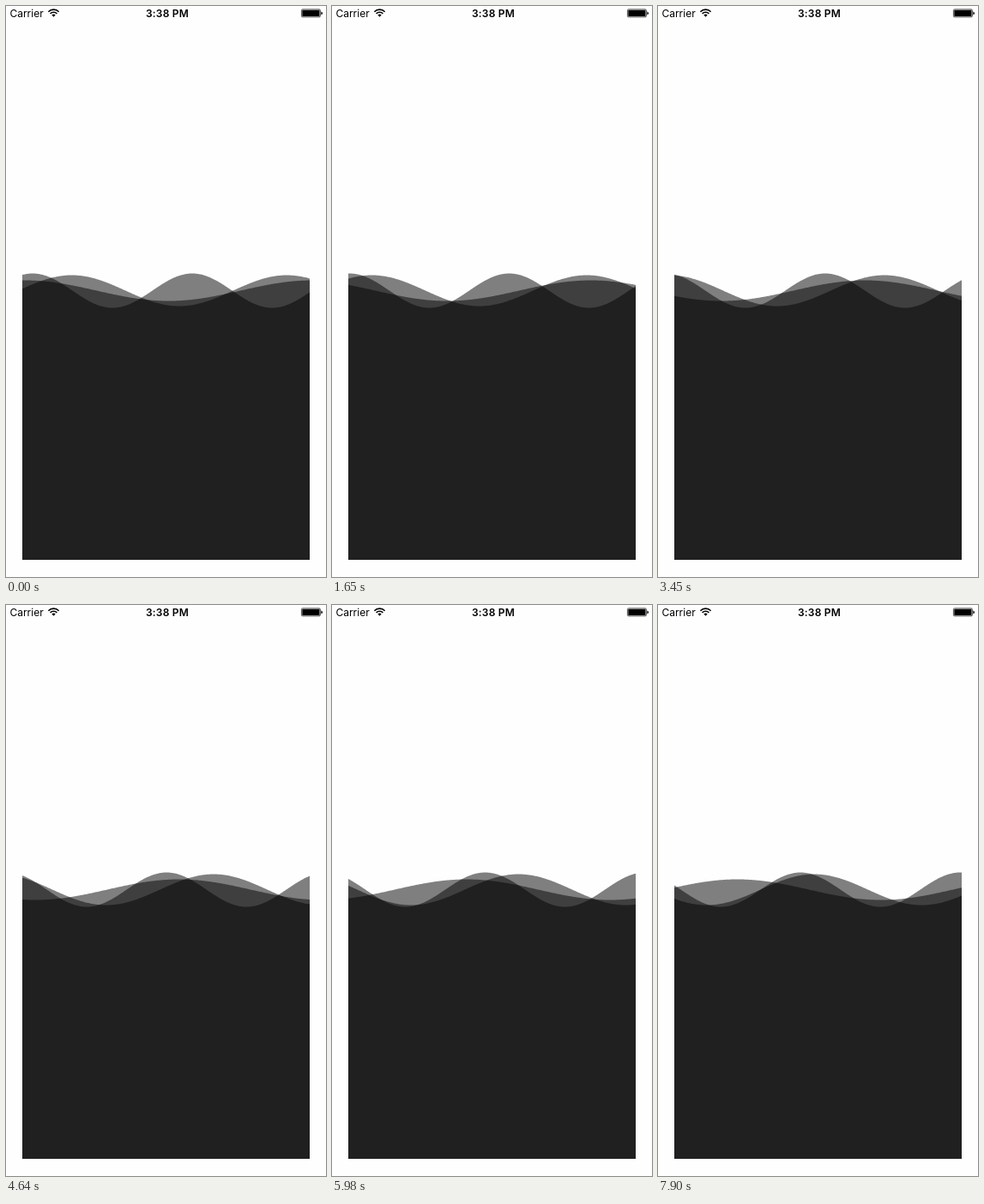
Recreate the animation shown at these times as an HTML page with a canvas. Size 373 by 665 pixels, loop 8 s.

```html
<!DOCTYPE html>
<html lang="en">
<head>
<meta charset="utf-8">
<title>Waves</title>
<style>
  html, body { margin: 0; width: 100%; height: 100%; overflow: hidden; background: #fefefe; }
  canvas, svg { position: absolute; left: 0; top: 0; display: block; }
  text { font-family: Inter, "Open Sans", sans-serif; font-size: 12px; fill: #000; }
  .time { font-weight: 600; letter-spacing: 0.2px; text-anchor: middle; }
</style>
</head>
<body>
<canvas id="stage" width="373" height="665"></canvas>
<svg width="373" height="20" viewBox="0 0 373 20">
  <text x="4.4" y="12.7">Carrier</text>
  <g fill="none" stroke="#000" stroke-width="1.6">
    <path d="M49.4 6.7A8.6 8.6 0 0 1 61.6 6.7"/>
    <path d="M51.6 8.9A5.5 5.5 0 0 1 59.4 8.9"/>
  </g>
  <path d="M55.5 12.8L53.4 10.6A3 3 0 0 1 57.6 10.6Z"/>
  <text class="time" x="188" y="12.7">3:38 PM</text>
  <rect x="344.4" y="3.9" width="22" height="9" rx="1.4" fill="none" stroke="#000" stroke-width="0.7"/>
  <rect x="345.3" y="4.8" width="20.2" height="7.2" rx="0.6"/>
  <path d="M367.4 6.6Q369 7 369 8.4T367.4 10.2Z"/>
</svg>
<script>
const ctx = document.getElementById('stage').getContext('2d');
const LOOP = 8000, LEFT = 19, RIGHT = 354, BOTTOM = 645, MID = 331.5;

// crest: x of one peak at time 0; speed: px per second to the left
const waves = [
  { amp: 20, len: 186.1, crest: 217.1, speed: 6.45 },
  { amp: 18, len: 250.5, crest: 327.2, speed: 18.37 },
  { amp: 12, len: 335, crest: 357, speed: 33.5 }
];

// Steps last 150 ms, a few of them 140 ms
const shortSteps = [30, 31, 42, 47, 50];
const starts = [];
for (let i = 0, t = 0; t < LOOP; i++) {
  starts.push(t);
  t += shortSteps.includes(i) ? 140 : 150;
}

function drawWave({ amp, len, crest, speed }, t) {
  const peak = crest - speed * t / 1000;
  ctx.beginPath();
  ctx.moveTo(LEFT, BOTTOM);
  for (let x = LEFT; x <= RIGHT; x++) {
    ctx.lineTo(x, MID - amp * Math.cos(2 * Math.PI * (x - peak) / len));
  }
  ctx.lineTo(RIGHT, BOTTOM);
  ctx.fill();
}

let shown = -1;
function render(now) {
  const t = now % LOOP;
  const start = starts.findLast(s => s <= t);
  if (start !== shown) {
    shown = start;
    ctx.clearRect(0, 0, 373, 665);
    ctx.fillStyle = 'rgba(0, 0, 0, 0.5)';
    waves.forEach(w => drawWave(w, start));
  }
}

let origin = null;
function tick() {
  const now = performance.now();
  if (origin === null) origin = now;
  render(now - origin);
  requestAnimationFrame(tick);
}
tick();
</script>
</body>
</html>
```
